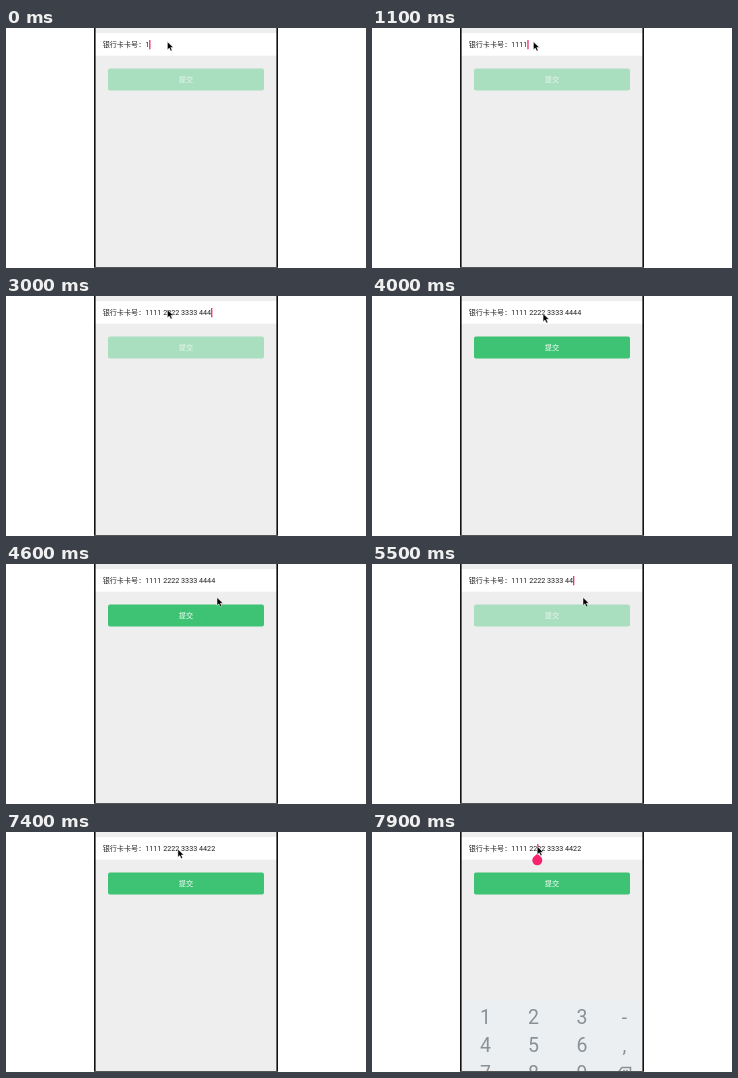
These frames come from a looping animation (360x240 px, 8 s). An HTML page:

```html
<!DOCTYPE html>
<html lang="zh-CN">
<head>
<meta charset="utf-8">
<title>银行卡卡号</title>
<style>
  html, body { margin: 0; width: 100%; height: 100%; overflow: hidden; background: #fff; }
  svg { display: block; width: 100vw; height: 100vh; }
  text { font: 7.2px Roboto, "Noto Sans CJK SC", "Noto Sans CJK", sans-serif; white-space: pre; }
  .mid { text-anchor: middle; }
  #keys text { font-size: 19.5px; fill: #899196; text-anchor: middle; }
</style>
</head>
<body>
<svg viewBox="0 0 360 240">
  <rect width="360" height="240" fill="#fff"/>
  <rect x="89" width="182" height="240" fill="#eee"/>
  <rect x="89" y="5" width="182" height="22.7" fill="#fff"/>
  <text x="96.7" y="19.3" fill="#222" style="font-size:7.1px">银行卡卡号：</text>
  <text id="num" x="139.2" y="19.3" fill="#222"></text>
  <rect id="caret" y="12" width="1.2" height="9.3" fill="#ec1c62"/>
  <rect id="btn" x="102" y="40.6" width="156" height="22" rx="2"/>
  <text id="label" class="mid" x="180" y="54.2" fill="#fff">提交</text>
  <g id="keys"><rect x="89" width="182" height="120" fill="#eceff1"/></g>
  <path id="handle" d="M165.3 21.8l3.8 3.3a5 5 0 1 1-7.6 0z" fill="#f5246d"/>
  <path id="mouse" d="M0 0v8l1.9-1.7 1.4 3 1.5-.7-1.4-2.9h2.6z" fill="#000" stroke="#fff" stroke-width=".5"/>
  <path d="M88.8 0v240M271.2 0v240" stroke="#111" stroke-width="1.6"/>
  <path d="M88 239.5h184" stroke="#555"/>
</svg>
<script>
const LOOP = 8000, BLINK = 500, TAP = 7500, FULL = 16;
const $ = id => document.getElementById(id);
const num = $('num'), caret = $('caret'), btn = $('btn'), label = $('label');
const keys = $('keys'), handle = $('handle'), mouse = $('mouse');

// [time, digits typed, last group]
const edits = [
  [0, 1], [400, 2], [700, 3], [1000, 4],
  [1300, 5], [1450, 6], [1600, 7], [1700, 8],
  [1900, 9], [2100, 10], [2300, 11], [2500, 12],
  [2600, 13], [2800, 14], [3000, 15], [3100, 16],
  [4900, 15], [5300, 14], [6300, 15, '4422'], [6600, 16, '4422']
];

const clamp = v => Math.max(0, Math.min(1, v));
const span = (t, a, b) => clamp((t - a) / (b - a));
const mix = (a, b, k) => a + (b - a) * k;
const inOut = k => k < .5 ? 4 * k ** 3 : 1 - 4 * (1 - k) ** 3;
const out = k => 1 - (1 - k) ** 2;
const show = (el, on) => el.setAttribute('visibility', on ? 'visible' : 'hidden');
const group = s => s.replace(/(.{4})(?=.)/g, '$1 ');

['123-', '456,', '789'].forEach((row, r) => [...row].forEach((ch, c) => {
  const key = document.createElementNS(num.namespaceURI, 'text');
  key.setAttribute('x', [113.5, 161.5, 210, 252.5][c]);
  key.setAttribute('y', 23 + r * 28);
  key.textContent = ch;
  keys.append(key);
}));
const erase = document.createElementNS(num.namespaceURI, 'path');
erase.setAttribute('d', 'M246 71.5l4-5h8.5v10H250zM251.5 69l4 5m0-5l-4 5');
erase.setAttribute('fill', 'none');
erase.setAttribute('stroke', '#899196');
erase.setAttribute('stroke-width', '1.5');
keys.append(erase);

function draw(t) {
  const [since, count, tail = '4444'] = edits.filter(e => e[0] <= t).pop();
  const text = group(('111122223333' + tail).slice(0, count));
  if (num.textContent !== text) num.textContent = text;

  const tapped = t >= TAP;
  const chars = tapped ? 7 : text.length;
  const age = t - (tapped ? TAP : since);
  caret.setAttribute('x', 139.2 + num.getSubStringLength(0, chars));
  show(caret, Math.floor(age / BLINK) % 2 === 0);
  show(handle, tapped);

  const ready = count === FULL;
  btn.setAttribute('fill', ready ? '#3dc373' : '#a9dfbf');
  label.setAttribute('opacity', ready ? 1 : .75);

  const go = inOut(span(t, 3800, 4350)), back = inOut(span(t, 7200, 7500));
  const x = mix(mix(161.4, 211, go), 165.3, back);
  const y = mix(mix(13.8, 33.5, go), 14.5, back);
  mouse.setAttribute('transform', `translate(${x} ${y})`);

  const rise = out(span(t, 7650, 7900));
  keys.setAttribute('transform', `translate(0 ${mix(205, 169, rise)})`);
  keys.setAttribute('opacity', rise);
}

const start = performance.now();
function tick() {
  draw((performance.now() - start) % LOOP);
  requestAnimationFrame(tick);
}
tick();
</script>
</body>
</html>
```
